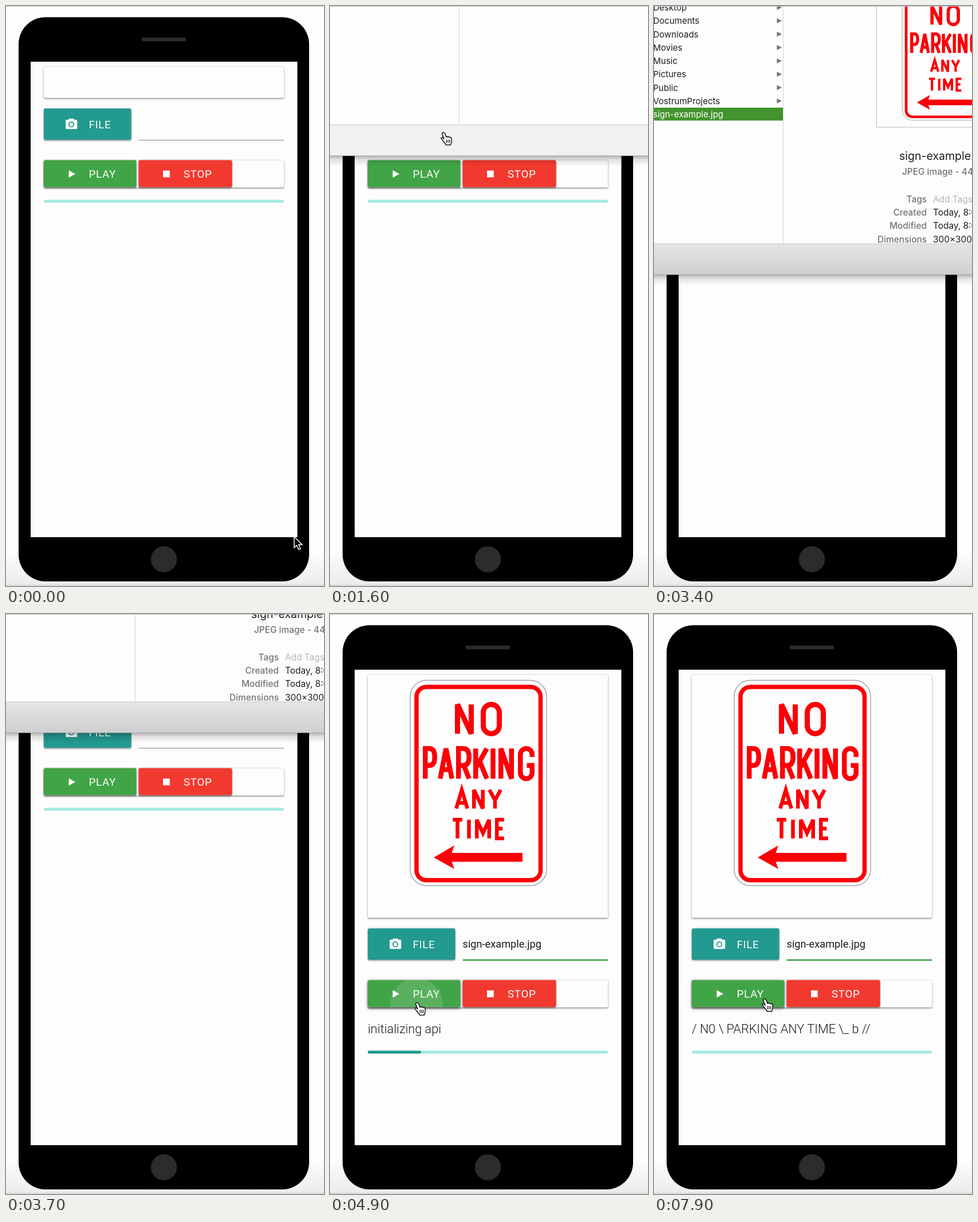
An HTML page that plays this animation: 555 px wide and 1010 px high, repeating every 8 s.

```html
<!DOCTYPE html>
<html lang="en">
<head>
<meta charset="utf-8">
<title>Sign reader</title>
<style>
html, body { margin: 0; width: 100%; height: 100%; overflow: hidden; background: #fefdff; }
svg { display: block; width: 555px; height: 1010px; }
text { white-space: pre; }
.raised { filter: drop-shadow(0 2px .8px #0004) drop-shadow(0 .6px 1.4px #0004); }
.hover { filter: drop-shadow(0 3px 1.6px #0005) drop-shadow(0 1px 3px #0004); }
.btn { font: 400 18.8px Roboto, sans-serif; letter-spacing: .65px; fill: #fff; }
.field { font: 400 18.2px Roboto, sans-serif; fill: #1c1b1d; }
.status { font: 300 21.7px Roboto, sans-serif; fill: #1c1b1d; }
.sheet { font: 400 15px Inter, sans-serif; fill: #1d1c1e; }
.info { font: 400 15.4px Inter, sans-serif; fill: #1d1c1e; }
.label { font-weight: 500; fill: #737275; text-anchor: end; }
</style>
</head>
<body>
<svg viewBox="0 0 555 1010">
  <defs>
    <linearGradient id="floor" x2="0" y2="1">
      <stop stop-color="#fefdff"/><stop offset="1" stop-color="#ebeaec"/>
    </linearGradient>
    <linearGradient id="bar" x2="0" y2="1">
      <stop stop-color="#e5e4e6"/><stop offset="1" stop-color="#cfced0"/>
    </linearGradient>
    <linearGradient id="shade" x2="0" y2="1">
      <stop stop-opacity=".3"/><stop offset=".35" stop-opacity=".12"/><stop offset="1" stop-opacity="0"/>
    </linearGradient>
    <clipPath id="playClip"><rect x="66" y="268.5" width="161.5" height="47" rx="3"/></clipPath>
    <g id="sign">
      <rect x="140" y="115.5" width="238" height="357.5" rx="28" fill="#fefdfe" stroke="#a5a4a6" stroke-width="1.5"/>
      <rect x="151" y="127" width="216.5" height="336.5" rx="17" fill="none" stroke="#fb0007" stroke-width="7.5"/>
      <g id="letters" fill="none" stroke="#fb0007"></g>
      <path d="M181 424L217 403L212.5 416H336V431.500H212.500L217 444Z" fill="#fb0007"/>
    </g>
  </defs>

  <rect width="555" height="1010" fill="#fefdff"/>
  <rect y="945" width="555" height="64" fill="url(#floor)"/>
  <rect y="1008.500" width="555" height="1" fill="#bcbbbd"/>
  <rect x="22" y="19.500" width="507" height="982.500" rx="47"/>
  <rect x="43" y="97" width="465.500" height="828" fill="#fefdfe"/>
  <rect x="236.500" y="55" width="78" height="6.500" rx="3.200" fill="#2b2a2c"/>
  <circle cx="275.500" cy="963.500" r="22.700" fill="#2c2b2d"/>

  <rect id="card" class="raised" x="66" y="106" width="419" height="54" rx="2" fill="#fefdfe"/>
  <use id="photo" href="#sign"/>
  <g id="form">
    <rect id="file" class="raised" x="66" y="178.500" width="152.500" height="54.500" rx="3" fill="#229a8f"/>
    <g fill="#fff">
      <path d="M110.500 196h7l2 2.200h-11z"/>
      <rect x="104" y="198" width="20.300" height="16.300" rx="2"/>
    </g>
    <circle cx="114" cy="206.200" r="4.200" fill="#fff" stroke="#229a8f" stroke-width="1.900"/>
    <text class="btn" x="144.500" y="212.500">FILE</text>
    <rect id="line" x="231.500" y="233" width="253.500"/>
    <text id="name" class="field" x="231.500" y="212">sign-example.jpg</text>
    <rect class="raised" x="66" y="269" width="419" height="47" rx="2" fill="#fefdfe"/>
    <rect id="play" class="raised" x="66" y="268.500" width="161.500" height="47" rx="3" fill="#41a446"/>
    <circle id="ripple" cx="151" cy="312" fill="#fff" clip-path="url(#playClip)"/>
    <path d="M109.500 286L121 292.500L109.500 299Z" fill="#fff"/>
    <text class="btn" x="144.500" y="299">PLAY</text>
    <rect class="raised" x="231.500" y="268.500" width="163" height="47" rx="3" fill="#f1392f"/>
    <rect x="274" y="286.500" width="11.800" height="11.800" fill="#fff"/>
    <text class="btn" x="310" y="299">STOP</text>
  </g>
  <text id="status" class="status" x="66" y="729.500"></text>
  <g id="progress">
    <rect x="66" y="337.500" width="419" height="5" rx="2.500" fill="#a1e9e0"/>
    <rect id="done" x="66" y="337.500" height="5" rx="2" fill="#229a8f"/>
  </g>

  <g id="sheet">
    <rect y="468" width="555" height="18" fill="url(#shade)"/>
    <rect y="-40" width="555" height="508" fill="#fefdfe"/>
    <rect x="225" y="-40" width="1" height="454" fill="#d3d2d4"/>
    <g id="list" class="sheet"></g>
    <g id="preview">
      <rect x="388.500" y="-40" width="240" height="251" fill="none" stroke="#b9b8ba"/>
      <use href="#sign" transform="translate(345 -99) scale(.63)"/>
      <g id="facts" class="info">
        <text x="428" y="267.500" style="font-size:19.500px">sign-example.jpg</text>
        <text x="433" y="293.500" style="font-weight:500;fill:#737275">JPEG image - 44 KB</text>
      </g>
    </g>
    <rect id="footer" y="414" width="555" height="54"/>
    <rect y="413.500" width="555" height="1" fill="#c9c8ca"/>
    <rect y="467.200" width="555" height="1" fill="#b4b3b5"/>
  </g>
  <rect width="555" height="1" fill="#c2c1c3"/>

  <path id="arrow" d="M0 0V19L4.300 15.200L7.800 22.500L11 21L7.700 14H13.800Z" stroke="#fff" stroke-width="1.500"/>
  <g id="hand" stroke="#111" stroke-width="1.500" stroke-linejoin="round" stroke-linecap="round">
    <path fill="#fff" d="M4 1C6 .3 7.300 1.500 8 3.200L10 8.800C10.300 7.300 12.500 7.400 13 9C13.700 7.700 15.800 8 16.200 9.800C17.200 8.800 19 9.500 19.200 11.500V16C19 19 17.800 20 17.500 22.500H9.500C9 20 6 18 4.500 15.500C3 13 1 12 1 10.500C1 9 4 9 6 12L3 4.500C2.300 2.800 2.600 1.500 4 1Z"/>
    <path fill="none" stroke-width="1.200" d="M10.300 13.500V18.500M13 13.500V18.500M15.700 13.500V18.500"/>
  </g>
</svg>
<script>
const LOOP = 8000;
const $ = id => document.getElementById(id);
const set = (id, attrs) => { for (const k in attrs) $(id).setAttribute(k, attrs[k]); };
const show = (id, on) => set(id, { visibility: on ? 'visible' : 'hidden' });
const move = (id, x, y) => set(id, { transform: `translate(${x} ${y})` });

// Sign lettering: strokes in a box w wide and h high
const glyphs = {
  N: (w, h) => `M0 ${h}V0L${w} ${h}V0`,
  O: (w, h) => `M0 ${w / 2}A${w / 2} ${w / 2} 0 0 1 ${w} ${w / 2}V${h - w / 2}A${w / 2} ${w / 2} 0 0 1 0 ${h - w / 2}Z`,
  P: (w, h) => `M0 ${h}V0H${w * .45}Q${w} 0 ${w} ${h * .28}T${w * .45} ${h * .56}H0`,
  A: (w, h) => `M0 ${h}L${w / 2} 0L${w} ${h}M${w * .16} ${h * .7}H${w * .84}`,
  R: (w, h) => `${glyphs.P(w, h)}M${w * .5} ${h * .56}L${w} ${h}`,
  K: (w, h) => `M0 0V${h}M${w} 0L0 ${h * .66}M${w * .36} ${h * .42}L${w} ${h}`,
  I: (w, h) => `M${w / 2} 0V${h}`,
  G: (w, h) => `M${w} ${h * .28}V${w / 2}A${w / 2} ${w / 2} 0 0 0 0 ${w / 2}V${h - w / 2}A${w / 2} ${w / 2} 0 0 0 ${w} ${h - w / 2}V${h * .56}H${w * .55}`,
  Y: (w, h) => `M0 0L${w / 2} ${h * .55}L${w} 0M${w / 2} ${h * .5}V${h}`,
  T: (w, h) => `M0 0H${w}M${w / 2} 0V${h}`,
  M: (w, h) => `M0 ${h}V0L${w / 2} ${h * .72}L${w} 0V${h}`,
  E: (w, h) => `M${w} 0H0V${h}H${w}M0 ${h * .48}H${w * .8}`
};
const signRows = [
  ['NO', 153, 60, 9, [218, 33, 263, 37]],
  ['PARKING', 230, 61, 8.500, [162, 25, 188, 29, 220, 27, 250, 28, 280, 9, 294, 27, 328, 29]],
  ['ANY', 303, 39, 6.500, [217, 26, 248, 22, 275, 26]],
  ['TIME', 355, 39, 6.500, [211, 23, 239, 7, 253, 28, 288, 19]]
];
$('letters').innerHTML = signRows.map(([word, y, h, weight, spots]) => [...word].map((c, i) =>
  `<path stroke-width="${weight}" transform="translate(${spots[2 * i] + weight / 2} ${y + weight / 2})" d="${glyphs[c](spots[2 * i + 1] - weight, h - weight)}"/>`
).join('')).join('');

const files = ['Desktop', 'Documents', 'Downloads', 'Movies', 'Music', 'Pictures', 'Public', 'VostrumProjects', 'sign-example.jpg'];
$('list').innerHTML = '<rect id="selection" y="177" width="225" height="22.500" fill="#42942c"/>' +
  files.map((name, i) => {
    const y = 2.700 + i * 23.250;
    const marker = i < 8 ? `<path d="M214.500 ${y - 4.500}L223 ${y - .2}L214.500 ${y + 4.200}Z" fill="#757477"/>` : '';
    return `<text id="row${i}" x="-1.500" y="${y + 5.300}">${name}</text>${marker}`;
  }).join('');

const facts = [['Tags', 'Add Tags…'], ['Created', 'Today, 8:05 AM'], ['Modified', 'Today, 8:05 AM'], ['Dimensions', '300×300']];
$('facts').innerHTML += facts.map(([label, value], i) => {
  const y = 341.700 + i * 23.300;
  return `<text class="label" x="476" y="${y}">${label}</text><text x="487" y="${y}"${i ? '' : ' style="fill:#b6b5b8"'}>${value}</text>`;
}).join('');

// Values between [time, ...numbers] keys
const linear = u => u;
const smooth = u => u * u * (3 - 2 * u);
function track(keys, t, ease = linear) {
  if (t <= keys[0][0]) return keys[0].slice(1);
  const i = keys.findIndex(k => k[0] > t);
  if (i < 0) return keys[keys.length - 1].slice(1);
  const a = keys[i - 1], b = keys[i];
  const u = ease((t - a[0]) / (b[0] - a[0]));
  return a.slice(1).map((v, j) => v + (b[j + 1] - v) * u);
}

const sheetKeys = [[1400, -20], [1500, 90], [1600, 261], [1700, 410], [1800, 468], [3500, 468], [3600, 410], [3700, 207], [3800, 60], [3900, -20]];
const progressKeys = [[4680, 0], [4900, .222], [5150, .78], [5250, 0], [6250, 1], [6300, 1], [6500, 0]];
const cursorKeys = [[0, 503, 924], [900, 193, 219.500], [1800, 193, 219.500], [2300, 50, 183], [2700, 50, 183],
  [3300, 570, 350], [3800, 570, 420], [4300, 147, 676], [7600, 147, 676], [7900, 188, 669.500]];

function draw(t) {
  const loaded = t >= 4000;
  const started = t >= 4400;
  const drop = loaded ? 369 : 0;

  set('card', { height: loaded ? 423 : 54 });
  show('photo', loaded);
  show('name', loaded);
  set('line', { height: loaded ? 2.600 : 1.300, fill: loaded ? '#41a446' : '#98979a', y: loaded ? 232.300 : 233 });
  move('form', 0, drop);
  move('progress', 0, drop + (started ? 54 : 0));
  $('status').textContent = !started ? '' : t < 5200 ? 'initializing api'
    : t < 6400 ? 'recognizing text' : '/ N0 \\ PARKING ANY TIME \\_ b //';
  set('done', { width: 419 * track(progressKeys, t)[0] });

  const grow = Math.min(1, Math.max(0, (t - 4770) / 700));
  set('ripple', { r: 161 * Math.sin(grow * Math.PI / 2), opacity: .13 * Math.min(1, Math.max(0, (5500 - t) / 500)) });

  const bottom = track(sheetKeys, t)[0];
  const listed = t >= 1900;
  show('sheet', bottom > 0);
  move('sheet', 0, bottom - 468);
  set('footer', { fill: listed ? 'url(#bar)' : '#f1f0f2' });
  set('list', { display: listed ? 'inline' : 'none' });
  set('selection', { opacity: t >= 2400 ? 1 : 0 });
  $('row8').style.fill = t >= 2400 ? '#fff' : '';
  set('preview', { display: t >= 2600 ? 'inline' : 'none' });

  const [x, y] = track(cursorKeys, t, smooth);
  const onFile = t < 1900 && x < 215 && y < 233;
  const onPlay = t >= 4000 && x < 222 && y > 636;
  show('hand', onFile || onPlay);
  show('arrow', !onFile && !onPlay);
  move('hand', x, y);
  move('arrow', x, y);
  set('file', { class: onFile ? 'hover' : 'raised' });
  set('play', { class: onPlay ? 'hover' : 'raised' });
}

const begin = performance.now();
function tick() {
  draw(Math.floor((performance.now() - begin) % LOOP / 100) * 100);
  requestAnimationFrame(tick);
}
tick();
</script>
</body>
</html>
```
